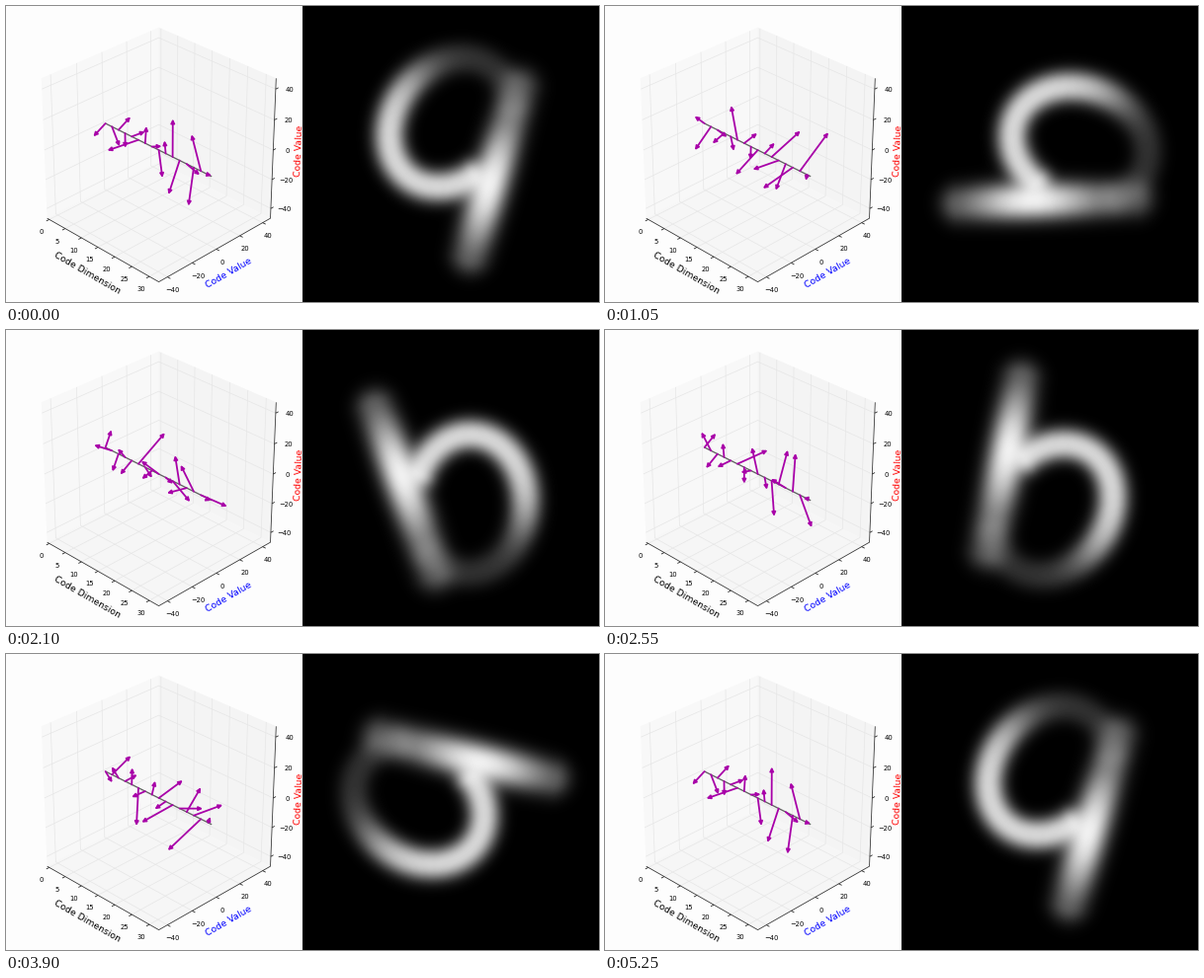
Write a matplotlib script that moves like this. It is 600x300 px and loops after 5.4 s.

```python
import numpy as np
import matplotlib.pyplot as plt
from matplotlib.animation import FuncAnimation
from matplotlib.patches import FancyArrowPatch, Polygon

W, H, DPI = 600, 300, 100
FRAMES, INTERVAL = 36, 150
PX = 72 / DPI  # points per pixel

plt.rcParams["font.family"] = "DejaVu Sans"
fig = plt.figure(figsize=(W / DPI, H / DPI), dpi=DPI, facecolor="#fdfdfd")
ax = fig.add_axes([0, 0, 1, 1])
ax.axis("off")


# --- 3D scene: unit cube seen from elevation 30, azimuth -45 ---
CX, CY, SCALE, DIST = 154.6, 146, 1637, 10
C45, S30, C30 = np.sqrt(0.5), 0.5, np.sqrt(0.75)


def project(x, y, z):
    """Cube coordinates (-0.5..0.5) to stage pixels."""
    side, near = C45 * (x + y), C45 * (x - y)
    k = SCALE / (DIST - z * S30 - near * C30)
    return CX + side * k, CY - (z * C30 - near * S30) * k


def dim(v):
    return (v + 2 / 3) / (100 / 3) - 0.5


def val(v):
    return v / 93.75


def line(points, color, width, z):
    xs, ys = zip(*(project(*p) for p in points))
    ax.plot(xs, ys, color=color, lw=width * PX, zorder=z, solid_capstyle="butt")


def pane(points, shade):
    ax.add_patch(Polygon([project(*p) for p in points], fc=str(shade), ec="none", zorder=1))


def label(x, y, text, size=9.3, color="black", rotation=0):
    ax.text(x, y, text, fontsize=size * PX, color=color, rotation=rotation,
            ha="center", va="center", zorder=5)


def tick(inner, outer, v, dx, dy):
    line([inner, outer], "#222222", 0.8, 4)
    x, y = project(*inner)
    label(x + dx, y + dy, str(v).replace("-", "\u2212"), 6.8)


h, out = 0.5, 0.525
pane([(-h, -h, -h), (-h, h, -h), (-h, h, h), (-h, -h, h)], 0.972)
pane([(-h, h, -h), (h, h, -h), (h, h, h), (-h, h, h)], 0.957)
pane([(-h, -h, -h), (h, -h, -h), (h, h, -h), (-h, h, -h)], 0.965)

GRID = "#e6e6e6"
for v in range(0, 31, 5):
    p = dim(v)
    line([(p, -h, -h), (p, h, -h), (p, h, h)], GRID, 0.7, 2)
    tick((p, -h, -h), (p, -out, -h), v, -8, 13)
for v in range(-40, 41, 20):
    p = val(v)
    line([(h, p, -h), (-h, p, -h), (-h, p, h)], GRID, 0.7, 2)
    line([(-h, -h, p), (-h, h, p), (h, h, p)], GRID, 0.7, 2)
    tick((h, p, -h), (out, p, -h), v, 5.5, 13.5)
    tick((h, h, p), (h, out, p), v, 14, 1)

line([(-h, -h, -h), (h, -h, -h), (h, h, -h), (h, h, h)], "#333333", 0.8, 3)
label(82.5, 270.5, "Code Dimension", rotation=-30)
label(225, 271, "Code Value", color="blue", rotation=30)
label(296.3, 146.5, "Code Value", color="red", rotation=87.6)
line([(dim(0), 0, 0), (dim(31), 0, 0)], "#606060", 1.3, 6)

# each pair of code values is one vector in the plane across the dimension axis
CODES = np.array([-10 - 5j, 6 - 16j, 10 + 5j, -10j, 11 - 1j, -25 + 3j, 1 + 11j, 8 - 3j,
                  3 - 20j, -1 + 9j, 25j, -9 - 19j, 11 - 12j, -4 - 24j, -8 + 27j, 3 - 2j])
arrows = [ax.add_patch(FancyArrowPatch((0, 0), (1, 1), arrowstyle="-|>", mutation_scale=5.6,
                                       lw=1.8 * PX, color="#a800a8", shrinkA=0, shrinkB=0,
                                       zorder=7))
          for _ in CODES]


# --- blurred digit: an uneven ring and a bent stem ---
t = np.radians(np.linspace(70, 355, 80))
RING = (450 + 62 * np.cos(t), 118 + 65 * np.sin(t - 0.2), 16.5,
        0.18 + 0.66 / (1 + np.exp((t - 4.15) / 0.24)))

u = np.linspace(0, 1, 50)
STEM = ((1 - u)**2 * 520 + 2 * u * (1 - u) * 489 + u**2 * 470,
        (1 - u)**2 * 82 + 2 * u * (1 - u) * 180 + u**2 * 252, 19.5,
        0.25 + 0.68 * np.exp(-((u - 0.55) / 0.35)**2))

N = 100
grid = (np.arange(N) + 0.5) * 300 / N - 150
GX, GY = np.meshgrid(grid, grid)


def stroke(path, x, y):
    px, py, width, bright = path
    glow = np.zeros_like(x)
    for cx, cy, b in zip(px, py, bright):
        d2 = ((x - cx)**2 + (y - cy)**2) / width**2
        np.maximum(glow, b * np.exp(-d2**1.2), out=glow)
    return glow


def digit(angle):
    c, s = np.cos(angle), np.sin(angle)
    x, y = 450 + GX * c + GY * s, 150 - GX * s + GY * c
    return 1 - (1 - stroke(RING, x, y)) * (1 - stroke(STEM, x, y))


image = ax.imshow(np.zeros((N, N)), cmap="gray", vmin=0, vmax=1, aspect="auto",
                  extent=(300, 600, 300, 0), interpolation="bicubic", zorder=8)
ax.set_xlim(0, W)
ax.set_ylim(H, 0)


def update(i):
    angle = 2 * np.pi * i / (FRAMES - 1)
    for k, (arrow, code) in enumerate(zip(arrows, CODES * np.exp(-1j * angle))):
        x = dim(2 * k)
        arrow.set_positions(project(x, 0, 0), project(x, val(code.real), val(code.imag)))
    image.set_data(digit(angle))
    return [*arrows, image]


anim = FuncAnimation(fig, update, frames=FRAMES, interval=INTERVAL,
                     repeat=True, repeat_delay=0)
plt.show()
```
